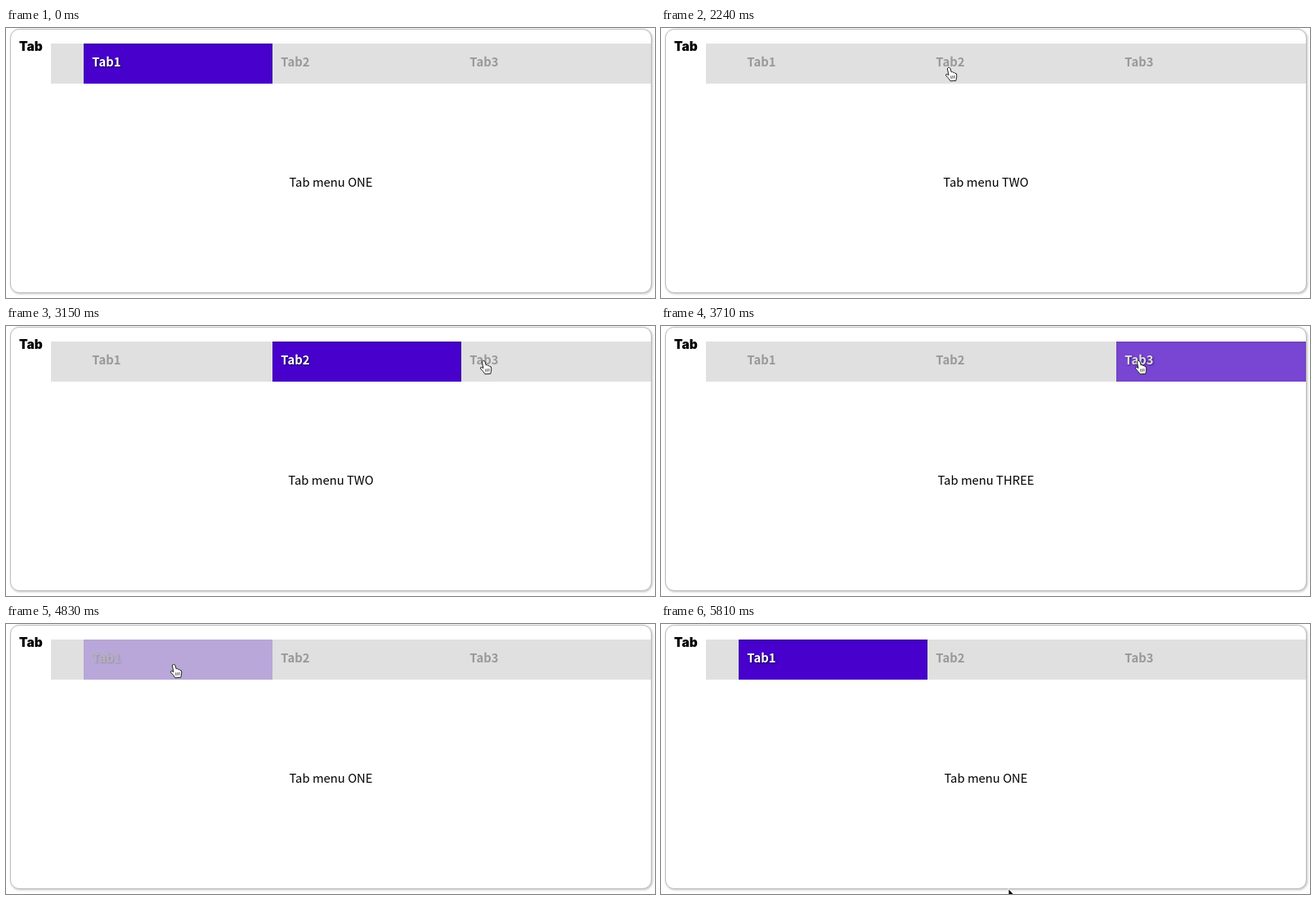
These frames come from a looping animation (794x330 px, 5.88 s). An HTML page:

```html
<!DOCTYPE html>
<html lang="en">
<head>
<meta charset="utf-8">
<title>Tab</title>
<style>
  html, body { margin: 0; width: 100%; height: 100%; overflow: hidden; background: #fff; }
  .card {
    position: absolute; left: 5px; top: 1px; width: 785px; height: 323px;
    box-sizing: border-box; border: 1px solid #bdbdbd; border-radius: 11px;
    background: #fff; box-shadow: 1px 1px 3px rgba(0, 0, 0, .25);
  }
  .bar { position: absolute; left: 55px; top: 19px; width: 734px; height: 49px; background: #e0e0e0; overflow: hidden; }
  .fill {
    position: absolute; top: 0; width: 231px; height: 49px;
    background: #4800cc; box-shadow: inset 0 1px 3px rgba(0, 0, 0, .35);
  }
  .fill:last-child { width: 232px; }
  svg { position: absolute; left: 0; top: 0; display: block; }
  text { font-family: "Noto Sans CJK KR", "Noto Sans CJK JP", "Noto Sans CJK", "Open Sans", sans-serif; }
  .title { font: 900 15.5px Inter, sans-serif; }
  .label { font-size: 14.8px; font-weight: 700; }
  .menu { font-size: 14.8px; text-anchor: middle; }
</style>
</head>
<body>
<div class="card"></div>
<div class="bar" id="bar"></div>
<svg id="stage" width="794" height="330" viewBox="0 0 794 330">
  <text class="title" x="16" y="28">Tab</text>
  <text id="menu" class="menu" x="397.5" y="193.7"></text>
  <g id="labels"></g>
  <g id="arrow">
    <path d="M.5 .5V13L3.4 10.4L5.3 15L7.4 14.1L5.4 9.7H9.2Z" stroke="#fff" stroke-width="1.4" paint-order="stroke"/>
  </g>
  <g id="hand" stroke="#222" stroke-linejoin="round">
    <path fill="#fff" d="M-1.6 2Q-1 -1 2 1.4L3.2 5.8Q5 5 5.4 6.4Q7 6 7.5 7.2Q10 7 9.8 10Q9.8 13 8.8 16.4L2 16.8Q0 13.5 -3.4 10Q-4 7 0 9.6Z"/>
    <path fill="none" stroke-width=".8" d="M2.6 10.5l.5 3.5m1.6 -3.8l.5 3.5m1.6 -3.7l.4 3.4"/>
  </g>
</svg>
<script>
const LOOP = 5880, STEP = 70, DELAY = 12, FADE = 320;
const names = ['ONE', 'TWO', 'THREE'];
const clicks = [-FADE * 2, 2240, 3570, 4760];
const HOME = { x: 425, y: 330 };
// pointer moves: start, end, to x, to y, downward sag on the way
const moves = [
  [0, 350, 408, 168, 0],
  [910, 980, 358, 70, 0],
  [980, 1260, 368, 32, 0],
  [1540, 1890, 352, 48, 0],
  [2590, 3150, 584, 42, 18],
  [3780, 4620, 205, 49, 110],
  [4830, 5320, 440, 239, 0],
  [5530, 5810, 425, 324, 0]
];

const $ = id => document.getElementById(id);
const mix = (a, b, k) => a + (b - a) * k;
const clamp = v => Math.max(0, Math.min(1, v));

// the CSS "ease" curve, cubic-bezier(.25, .1, .25, 1)
function ease(x) {
  const curve = (a, b, s) => 3 * a * s * (1 - s) ** 2 + 3 * b * s * s * (1 - s) + s ** 3;
  let lo = 0, hi = 1;
  for (let i = 0; i < 24; i++) {
    const mid = (lo + hi) / 2;
    if (curve(.25, .25, mid) < x) lo = mid; else hi = mid;
  }
  return x >= 1 ? 1 : curve(.1, 1, lo);
}

const tabs = names.map((_, i) => {
  const fill = $('bar').appendChild(document.createElement('div'));
  fill.className = 'fill';
  fill.style.left = 40 + 231 * i + 'px';
  const label = $('labels').appendChild(document.createElementNS('http://www.w3.org/2000/svg', 'text'));
  label.setAttribute('class', 'label');
  label.setAttribute('x', 105.3 + 231 * i);
  label.setAttribute('y', 47);
  label.textContent = 'Tab' + (i + 1);
  return { fill, label };
});

function pointerAt(t) {
  let { x, y } = HOME;
  for (const [from, to, tx, ty, sag] of moves) {
    if (t < from) break;
    const k = ease(clamp((t - from) / (to - from)));
    x = mix(x, tx, k);
    y = mix(y, ty, k) + sag * Math.sin(Math.PI * k);
  }
  return { x, y };
}

function draw(t) {
  const count = clicks.filter(c => c <= t).length - 1;
  const active = count % names.length;
  const on = ease(clamp((t - clicks[count] - DELAY) / FADE));
  tabs.forEach(({ fill, label }, i) => {
    const p = i === active ? on : 0, c = Math.round(mix(153, 255, p));
    fill.style.opacity = p;
    label.style.fill = `rgb(${c},${c},${c})`;
    label.style.filter = p ? `drop-shadow(1px 1px 1px rgba(0,0,0,${.75 * p}))` : 'none';
  });
  $('menu').textContent = 'Tab menu ' + names[active];

  const { x, y } = pointerAt(t), over = y < 68;
  for (const id of ['hand', 'arrow']) {
    $(id).style.display = (id === 'hand') === over ? '' : 'none';
    $(id).setAttribute('transform', `translate(${x} ${y})`);
  }
}

const t0 = performance.now();
function tick() {
  const t = (performance.now() - t0) % LOOP;
  draw(Math.floor(t / STEP) * STEP);
  requestAnimationFrame(tick);
}
draw(0);
requestAnimationFrame(tick);
</script>
</body>
</html>
```
